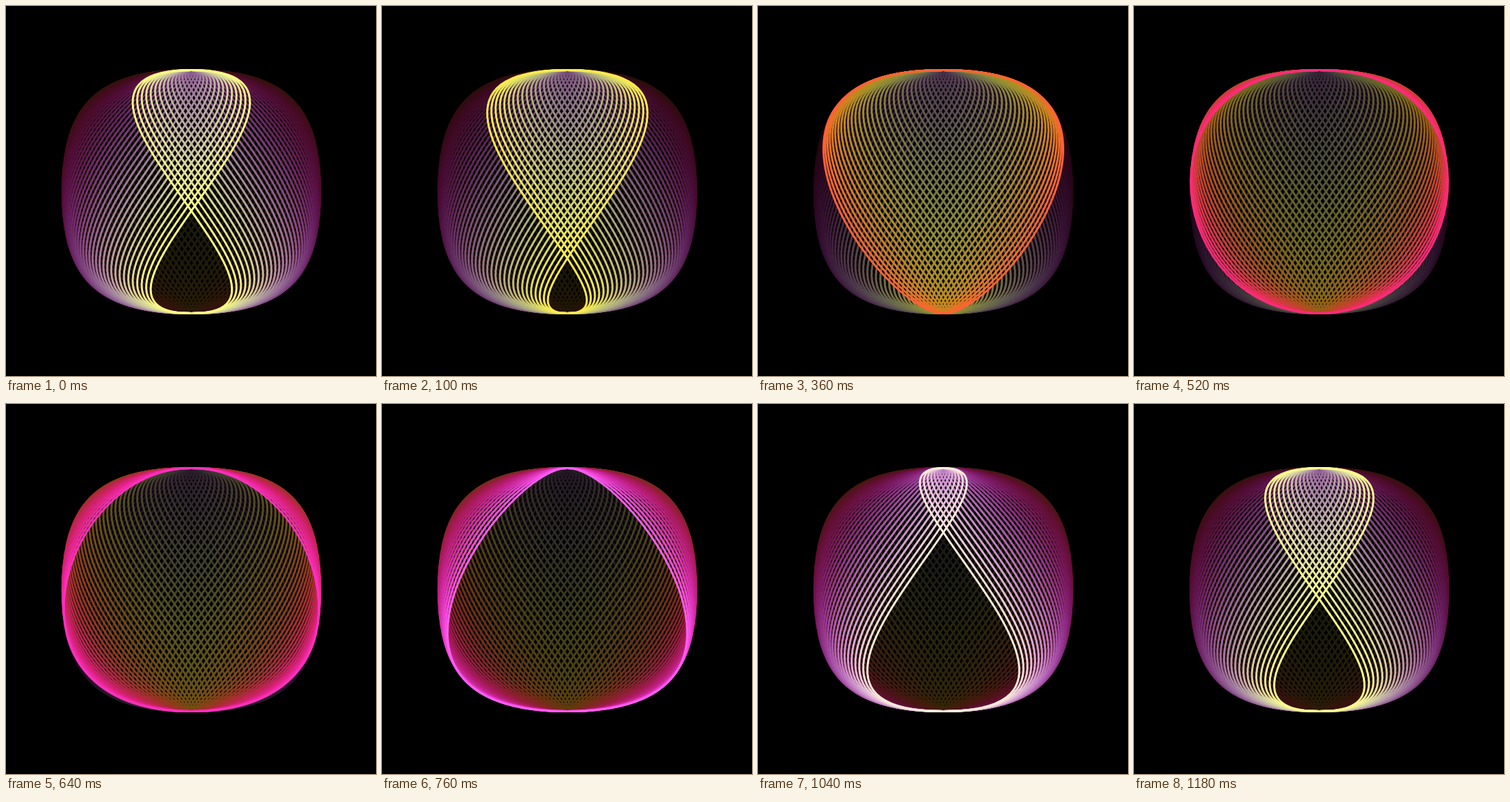
An HTML page with a canvas for the animation above (1.2 s loop, 540 by 540 pixels).

```html
<!DOCTYPE html>
<html lang="en">
<head>
<meta charset="utf-8">
<title>Rotating ribbon</title>
<style>
  html, body { margin: 0; width: 100%; height: 100%; overflow: hidden; background: #000; }
  canvas { display: block; }
</style>
</head>
<body>
<canvas id="stage" width="540" height="540"></canvas>
<script>
const ctx = document.getElementById('stage').getContext('2d');
const STEPS = 60, STEP_MS = 20, FADE = 0.962;
const CX = 270.5, TOP = 93.5, SIZE = 355, BOTTOM = TOP + SIZE;
const rad = deg => deg * Math.PI / 180;

function strokeColour(step, light) {
  const hue = rad(6 * step + 10);
  const rgb = [255, 150 + 110 * Math.cos(hue), 150 - 110 * Math.sin(hue)];
  return `rgb(${rgb.map(c => Math.round(Math.min(255, c) * light)).join()})`;
}

// Two mirrored curves whose handles turn about the vertical axis, a quarter turn apart.
function drawRibbon(step, light) {
  const turn = rad(3 * step - 39);
  const upper = SIZE * Math.cos(turn), lower = SIZE * Math.sin(turn);
  ctx.strokeStyle = strokeColour(step, light);
  ctx.beginPath();
  for (const side of [1, -1]) {
    ctx.moveTo(CX, TOP);
    ctx.bezierCurveTo(CX + side * upper, TOP, CX + side * lower, BOTTOM, CX, BOTTOM);
  }
  ctx.stroke();
}

function draw(now) {
  const step = Math.floor(now / STEP_MS) % STEPS;
  ctx.fillStyle = '#000';
  ctx.fillRect(0, 0, 540, 540);
  ctx.lineWidth = 3;
  for (let age = STEPS - 1; age >= 0; age--) drawRibbon(step - age, FADE ** age);
}

const start = performance.now();
function tick() {
  draw(performance.now() - start);
  requestAnimationFrame(tick);
}
tick();
</script>
</body>
</html>
```
